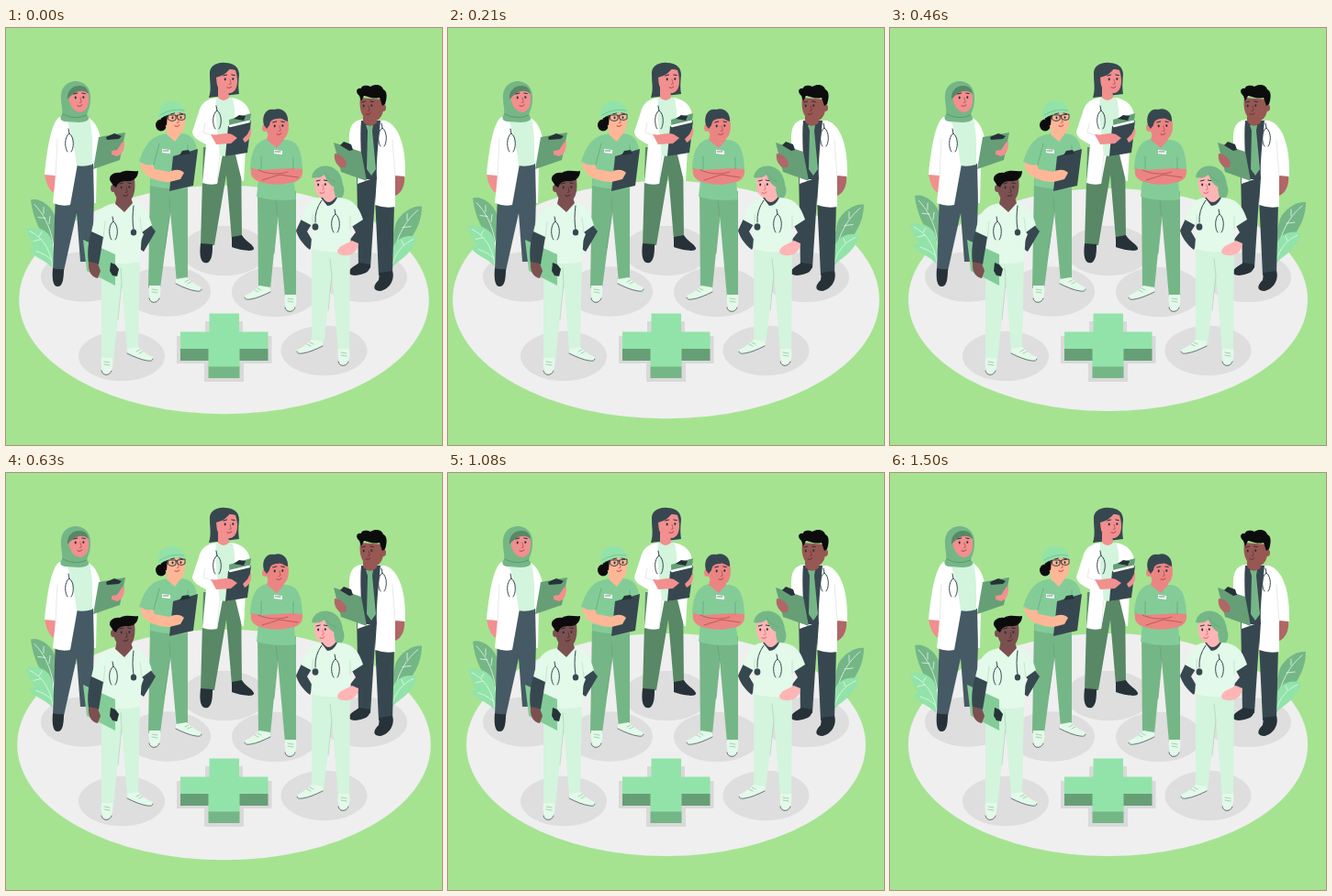
An HTML page that plays this animation: 475 px wide and 455 px high, repeating every 1540 ms.

```html
<!DOCTYPE html>
<html lang="en">
<head>
<meta charset="utf-8">
<title>Medical team</title>
<style>
html, body { margin: 0; width: 100%; height: 100%; overflow: hidden; background: #a5e391 }
svg { display: block; width: 475px; height: 455px }
</style>
</head>
<body>
<svg id="stage" viewBox="0 0 475 455"></svg>
<script>
const INK = '#263238', BLACK = '#0c0c0c', SLATE = '#37474f', NAVY = '#455a64', WHITE = '#fff', SHADE = '#dedede';
const MINT = '#d3f4dd', PALE = '#e3f9e9', LIGHT = '#92e3a9', FRESH = '#83cc98', GREEN = '#75b687', DEEP = '#669f76', FOREST = '#588865';
const PINK = '#f28f8f', ROSE = '#ffb5b5', PEACH = '#fdb797', CORAL = '#eb8583', BROWN = '#b16668', UMBER = '#975752', COCOA = '#7c5050';

const fill = (color, d) => `<path fill="${color}" d="${d}"/>`;
const line = (color, d, w = 0.7) => `<path fill="none" stroke="${color}" stroke-width="${w}" stroke-linecap="round" stroke-linejoin="round" d="${d}"/>`;
const oval = (color, x, y, rx, ry) => `<ellipse fill="${color}" cx="${x}" cy="${y}" rx="${rx}" ry="${ry}"/>`;

// Eyes, brows, nose and mouth around the point between the eyes
const face = (x, y, gap = 4.3, lip = '#9a3b42') =>
  oval(INK, x - gap, y, 1, 1.4) + oval(INK, x + gap, y - .4, 1, 1.4) +
  line(INK, `M${x - gap - 2} ${y - 4}l4-1M${x + gap - 1.5} ${y - 5}l3.5 .6`, 1) +
  line(lip, `M${x + 1} ${y}l1.2 5-2 .6`, .6) + line(lip, `M${x - 2} ${y + 9}q3 1.5 5-1`, .9);

const stethoscope = (x, y) =>
  line(SLATE, `M${x - 1} ${y - 15}L${x} ${y - 10}C${x - 6} ${y - 6} ${x - 5} ${y + 7} ${x - 2} ${y + 10}M${x} ${y - 10}C${x + 6} ${y - 6} ${x + 5} ${y + 7} ${x + 2} ${y + 10}`, 1);

const shoeFront = (x, y) =>
  fill(PALE, `M${x} ${y}h12c1 6 0 10-1 14c-1 4-8 5-10 1c-1-5-2-10-1-15Z`) +
  line(SLATE, `M${x} ${y + 14}c1 6 9 6 11 0`) + line(GREEN, `M${x + 3} ${y + 4}l6 1M${x + 3} ${y + 7}l6 1`, .6);

const shoeSide = (x, y, dir) => `<g transform="translate(${x} ${y}) scale(${dir} 1)">` +
  fill(PALE, 'M0 1L12-1C17 4 23 8 28 10C30 13 27 15 22 14C14 12 6 8 0 6Z') +
  line(SLATE, 'M0 6C8 10 15 13 22 14Q28 15 28 12') + line(GREEN, 'M10 4l4-2M13 6l4-2', .6) + '</g>';

const shadows = [[85, 271.5], [176, 287.5], [238, 243], [293, 288], [390, 272], [126, 358], [346.5, 352]]
  .map(([x, y]) => oval(SHADE, x, y, 47, 27.3)).join('');

const cross =
  fill('#d9d9d9', 'M217 320H258V336H289.500V366H259V386H216V366H186V336H217Z') +
  fill(DEEP, 'M190 350H221V363H190ZM254 350H285.500V363H254Z') +
  fill(GREEN, 'M220.500 369H254.500V382H220.500Z') +
  fill(LIGHT, 'M221.500 311.500H254V331.500H285.500V350H254.500V369.500H220.500V350H190V331.500H221.500Z');

const leaves =
  fill(GREEN, 'M27 188C36 185 49 194 53 205C56 216 54 232 50 237C38 226 29 208 27 188Z') +
  line(PALE, 'M31 193C40 202 48 216 51 234M41 203v-7M47 214l1-8M43 208l-8-1', .8) +
  fill(LIGHT, 'M22 219C29 216 43 219 48 228C53 239 53 254 50 262C44 254 30 251 25 242Q29 241 31 240C28 235 24 228 22 219Z') +
  line(PALE, 'M26 222C39 228 48 241 51 260M36 228l3-5M38 231l-8 2M33 244q10 3 16 9', .8) +
  fill(GREEN, 'M453 195C443 194 430 202 425 213C421 225 420 240 420 252C436 239 453 220 453 195Z') +
  line(PALE, 'M449 199C438 208 427 223 422 248M437 210v-7M432 218l9-1', .8) +
  fill(LIGHT, 'M448 229C438 225 426 229 422 239L419 264C424 255 442 250 448 229Z') +
  line(PALE, 'M444 231C434 235 425 244 421 258M433 237l-2-5', .8);

const hijabDoctor =
  fill(NAVY, 'M54 180L77 147H97L94 255H81L77 202L63 265H51Z') +
  fill(INK, 'M51 262Q57 264 63 263C63 272 62 282 57 282C51 283 50 273 51 262Z') +
  fill(PINK, 'M42 158H54C53 164 56 173 54 179C50 182 43 171 42 158Z') +
  fill(WHITE, 'M58 97C51 103 46 120 42 160L54 161L51 191Q61 195 70 193L78 148L95 148L96 191H98L99 146L105 142C105 124 102 105 90 98Z') +
  fill(MINT, 'M66 99L91 99C95 116 94 135 94 149Q84 152 77 150C75 130 70 112 66 99Z') +
  line(SHADE, 'M56 121L54 162') + stethoscope(69, 125) +
  fill(GREEN, 'M60 78C59 64 67 58 77 58C87 59 93 67 92 78C92 86 89 91 88 95C93 99 89 103 79 103L64 102C58 101 59 97 61 94C62 89 60 84 60 78Z') +
  fill(PINK, 'M68 76C70 70 76 66 82 66C88 67 91 72 90 79C90 86 87 91 81 92C74 91 70 86 68 76Z') +
  fill(FOREST, 'M67 78C66 69 72 63 80 63C87 63 89 67 90 72C84 66 75 68 67 78Z') +
  face(80, 76) + line(FOREST, 'M62 94Q75 101 88 95') +
  fill(DEEP, 'M101 119L130 114L124 144L95 154Z') + fill(INK, 'M109 119l9-4l8 3l-3 3l-13 1Z') +
  fill(PINK, 'M129 124C129 133 127 138 121 140L115 138L115 134L121 133L127 124Z');

const longHairDoctor =
  fill(FOREST, 'M215 130H256L257 230L246 231L240 160L227 237L212 237Z') +
  fill(INK, 'M212 235L225 236C225 243 225 253 220 256C213 258 210 251 212 235ZM246 228L257 226C260 232 268 235 270 240C271 244 261 244 246 239Z') +
  fill(SLATE, 'M222 51C221 42 229 37 239 38C248 38 254 43 254 51C253 60 253 66 254 72L221 76C224 67 222 60 222 51Z') +
  fill(WHITE, 'M229 76C218 77 212 83 210 92L203 113C203 120 212 124 218 127L214 169Q222 172 230 170L236 138H250L257 167H259L262 112L267 101C266 87 261 79 246 76Z') +
  fill(MINT, 'M229 76L246 76C251 85 249 110 248 138Q239 141 233 139C231 120 227 92 229 76Z') +
  line(SHADE, 'M217 104L215 114L226 118M233 138L230 169') + stethoscope(230, 100) +
  fill(PINK, 'M231 64H242L243 76Q237 82 231 76Z') +
  fill(PINK, 'M228 55C228 48 240 43 250 46C254 58 252 69 245 71C235 72 229 65 228 55Z') +
  fill(SLATE, 'M223 58C222 45 231 39 246 41Q240 52 229 54L230 64L226 70Z') + face(243, 56) +
  fill(DEEP, 'M243 100L267 93L264 130L244 131Z') + fill(INK, 'M248 99l6-4l7 1l-2 5Z') +
  fill(SLATE, 'M242 107L267 101L263 136L239 140Z') +
  line(WHITE, 'M244 107L265 102', 2.5) +
  fill(PINK, 'M223 116C231 118 238 113 246 116L252 120L245 126L229 127Z') +
  fill(PINK, 'M267 108C268 117 266 122 260 125L258 121L263 116Z');

const capNurse =
  fill(GREEN, 'M157 165H198L198 277L186 278L179 200L168 284H155Z') + line(DEEP, 'M178 186L179 201L173 240') +
  shoeFront(156, 281) + shoeSide(185, 273, 1) +
  oval(BLACK, 169, 106, 6, 6.5) +
  fill(FRESH, 'M175 115Q182 122 190 115C202 116 207 121 209 137L199 142L198 175Q178 177 157 172L160 136C163 122 168 117 175 115Z') +
  fill(FRESH, 'M172 116C157 118 150 130 145 146Q154 152 161 149L168 133Z') + line(DEEP, 'M167 126L161 149M198 128v14') +
  fill(PEACH, 'M176 108H188L190 116L184 124L175 116Z') +
  fill(PEACH, 'M172 94L194 90C197 102 195 114 187 118C177 118 172 108 172 94Z') +
  fill(BLACK, 'M168 96L176 94L175 106L171 107Z') +
  fill(LIGHT, 'M166 98C165 84 173 79 182 80C191 81 195 87 195 93Q181 91 168 99Z') + line(GREEN, 'M168 95Q181 87 194 90') +
  face(186, 98, 4.5, '#c12d3b') +
  line(INK, 'M177 95h8v5q-4 3-8 0ZM187 95l8-1v5q-4 3-8 0ZM172 97l5-1M185 96h2', .9) +
  fill(WHITE, 'M170 132l9 1v4l-9-1Z') + line(SLATE, 'M171 134h6', .7) +
  fill(SLATE, 'M182 140L209 132L204 172L178 178Z') + fill(INK, 'M189 139l3-5l7-1l2 4Z') +
  fill(PEACH, 'M146 146Q153 151 160 149L162 154L178 157C184 154 190 154 194 158L190 165L178 168C164 168 147 162 146 146Z');

const crossedArms =
  fill(GREEN, 'M274 178H316L316 294H304L296 204L288 285H275Z') + line(DEEP, 'M294 188L296 206L292 246') +
  shoeSide(288, 282, -1) + shoeFront(304, 291) +
  fill(FRESH, 'M284 121Q293 127 303 122C316 122 322 129 323 154L313 158L316 187Q294 190 273 184L276 156L266 154C267 136 271 124 284 121Z') +
  fill(CORAL, 'M286 114H300L303 122L295 131L284 122Z') +
  fill(CORAL, 'M282 99L306 95C310 108 308 120 299 123C287 125 282 113 282 99Z') + oval(CORAL, 282, 109, 3, 4) +
  fill(SLATE, 'M281 106C278 95 284 87 292 89C300 86 308 92 307 102C303 101 300 97 296 99C290 99 288 101 287 106L284 110Z') + face(297, 107) +
  fill(WHITE, 'M292 133l9 1v4l-9-1Z') + line(SLATE, 'M293 135h6', .7) +
  fill(CORAL, 'M267 153L279 155L310 153L323 154C324 163 319 168 309 169C299 172 284 171 274 167C268 164 266 160 267 153Z') +
  line('#b95558', 'M275 155C286 160 299 160 307 157M279 166L298 160L318 163', .9) +
  line(DEEP, 'M278 140V154M313 141V154');

const tieDoctor =
  fill(SLATE, 'M382 150H424L421 270H406L402 185L397 262H384Z') +
  fill(INK, 'M385 256L397 258C397 266 391 269 380 270C371 269 370 265 385 256ZM407 267L421 265C424 274 418 285 408 287C400 287 399 282 406 275Z') +
  fill(BROWN, 'M423 159L434 161C435 172 431 181 422 184C416 183 419 178 421 173Z') +
  fill(WHITE, 'M386 100C377 102 373 109 374 125L372 136L383 142L383 170L397 165L404 163L402 193Q413 197 424 195L424 161L435 162C436 132 429 106 413 101Z') +
  fill(SLATE, 'M387 101L408 101C406 122 403 145 404 165L387 165C388 143 385 119 387 101Z') +
  fill(GREEN, 'M392 106h8l-1 6l4 42l-5 7l-5-7l1-42Z') + line(SHADE, 'M421 122L424 162') + stethoscope(410, 119) +
  fill(UMBER, 'M389 94H404L404 103Q396 111 389 102Z') +
  fill(UMBER, 'M386 76L411 78C413 93 408 102 399 102C389 101 384 91 386 76Z') + oval(UMBER, 411, 87, 3, 4) +
  fill(BLACK, 'M385 74C380 70 382 65 387 66C387 62 394 62 397 64C404 60 410 63 411 67C416 69 415 77 413 83L410 85L407 76C399 78 393 74 390 74L387 80Z') + face(394, 85, 4.3, '#602d32') +
  fill(DEEP, 'M357 125L387 135L393 167L365 157Z') + fill(INK, 'M364 128l4-4l8 3l2 6l-4 1Z') +
  fill(BROWN, 'M358 137C363 137 369 141 371 147L370 152L364 152C359 148 357 143 358 137Z');

const scrubsMan =
  fill(MINT, 'M104 246H146L144 352H132L126 276L117 364H104Z') + line('#a8d4b4', 'M125 262L126 278L122 318') +
  shoeFront(104, 360) + shoeSide(132, 349, 1) +
  fill(SLATE, 'M155 212L163 222L150 244L144 240L150 225L145 219Z') +
  fill(PALE, 'M119 191Q128 195 138 190C149 191 154 199 159 215L148 223L146 255Q125 260 105 254L106 228L93 223C97 204 101 194 119 191Z') +
  fill(COCOA, 'M121 182H135L138 191L129 201L119 192Z') +
  line('#b8dfc3', 'M108 211L106 230M146 207L148 223') + stethoscope(117, 221) +
  line(SLATE, 'M139 194Q137 208 139 220', 1) + oval(SLATE, 139, 223, 3.2, 3.5) +
  fill(COCOA, 'M116 166L140 165C142 181 137 190 130 190C121 190 116 181 116 166Z') + oval(COCOA, 117, 175, 3, 4) +
  fill(BLACK, 'M113 166C112 160 119 157 124 158C131 154 137 157 144 156C144 164 138 168 130 167Q122 167 120 174L117 172Z') + face(130, 174, 4.3, '#3d2224') +
  fill(FRESH, 'M84 231L119 247L119 281L88 265Z') + fill(INK, 'M114 256l5 2l4 5l-2 8l-5-1l-3-5Z') +
  fill(SLATE, 'M93 222L106 228L101 258L90 257C88 244 90 232 93 222Z') +
  fill(COCOA, 'M90 255L100 257L103 265L100 273C94 272 89 267 90 255Z');

const scrubsWoman =
  fill(MINT, 'M333 238H375L374 354H362L355 268L346 346H333Z') + line('#a8d4b4', 'M353 252L355 270L351 308') +
  shoeSide(345, 341, -1) + shoeFront(362, 350) +
  fill(SLATE, 'M322 208L333 214L328 222L335 234L331 242C323 236 318 228 316 221ZM376 214L387 207L396 221C391 230 384 236 377 239L373 233L381 223Z') +
  fill(GREEN, 'M345 154C360 148 366 160 367 171C370 178 368 184 364 187L347 184Z') +
  fill(PALE, 'M343 185C333 186 328 191 321 209L334 216L332 241Q353 247 376 243L375 218L389 209C384 193 377 186 362 185Z') +
  fill(SLATE, 'M343 185L361 185Q357 194 350 194Z') + fill(ROSE, 'M345 176H357L359 185Q351 195 345 185Z') +
  line('#b8dfc3', 'M334 204V217M375 205V219') + stethoscope(359, 213) +
  line(SLATE, 'M344 188Q336 199 337 212', 1) + oval(SLATE, 337, 217, 3.4, 3.8) +
  fill(ROSE, 'M336 164C341 156 353 158 358 166C359 180 352 186 344 185C337 182 335 175 336 164Z') +
  fill(GREEN, 'M333 163C334 154 343 149 352 151C363 153 366 166 368 178C364 185 359 181 358 174Q350 170 347 160Q341 165 333 163Z') +
  line(DEEP, 'M347 158Q352 166 359 168') + face(344, 171, 3.8, '#c75a63') +
  fill(ROSE, 'M377 232L384 235C383 244 377 249 367 248C360 247 359 243 365 238Z');

document.getElementById('stage').innerHTML =
  '<rect width="475" height="455" fill="#a5e391"/>' + '<ellipse id="floor" cx="237.5" cy="296.5" fill="#efefef"/>' +
  shadows + cross + `<g id="leaves">${leaves}</g>` +
  hijabDoctor + longHairDoctor + tieDoctor + capNurse + crossedArms + scrubsMan + scrubsWoman;

const floor = document.getElementById('floor'), plants = document.getElementById('leaves');
const LOOP = 1540, LEAD = 40;

// Linear pulse from 0 up to 1 and back
const pulse = (p, start, peak, end) =>
  Math.max(0, p < peak ? (p - start) / (peak - start) : (end - p) / (end - peak));

function draw() {
  const p = (performance.now() + LEAD) % LOOP / LOOP;
  const scale = 1 + 0.1 * (pulse(p, 0, .1, .3) + pulse(p, .4, .5, .6));
  floor.setAttribute('rx', 217.5 * scale);
  floor.setAttribute('ry', 121.5 * scale);
  plants.setAttribute('transform', `translate(0 ${-7.5 * pulse(p, 0, .5, 1)})`);
  requestAnimationFrame(draw);
}
draw();
</script>
</body>
</html>
```
